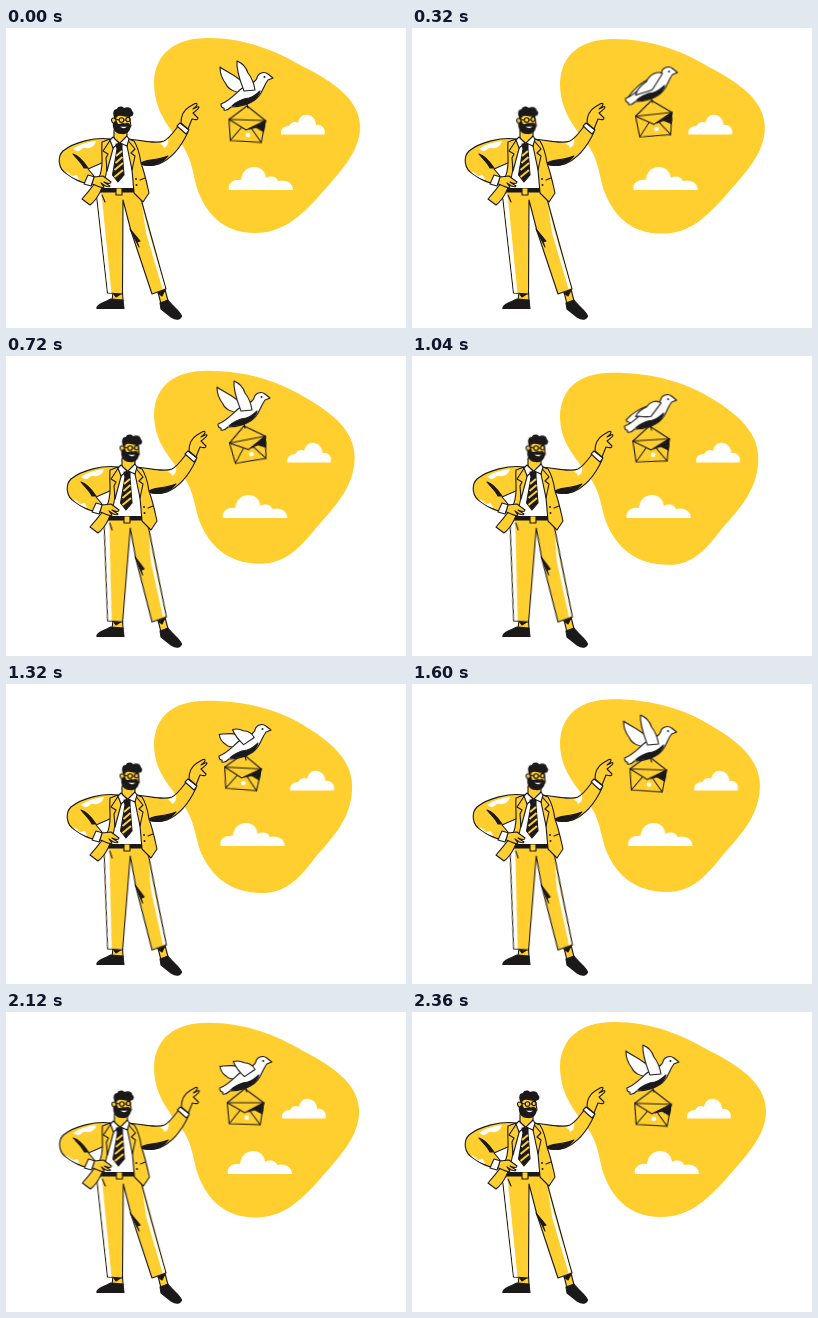
An HTML page without scripts that plays this animation: 400 by 300 pixels, repeating every 2.4 s.

```html
<!DOCTYPE html>
<html lang="en">
<head>
<meta charset="utf-8">
<title>Pigeon post</title>
<style>
  html, body { margin: 0; width: 100%; height: 100%; overflow: hidden; background: #fff; }
  svg { display: block; width: 100%; height: 100%; }
  .y { fill: #ffce2f; }
  .w { fill: #fff; }
  .k { fill: #1b191a; }
  .n { fill: none; }
  .line { stroke: #1b191a; stroke-width: 1.1; stroke-linejoin: round; stroke-linecap: round; }
  .plain { stroke: none; }

  .blob { animation: blob 2.4s ease-in-out infinite; }
  .cloud { animation: drift 2.4s ease-in-out infinite; }
  .high { --dx: 9.5px; }
  .low { --dx: -8.5px; }
  .torso { animation: sway 2.4s ease-in-out infinite; }
  .legs { transform-origin: 0 267px; animation: lean 2.4s ease-in-out infinite; }
  .head { transform-origin: 115px 108px; animation: nod 2.4s ease-in-out infinite; }
  .bird { animation: hover 2.4s linear infinite; }
  .mail { transform-origin: 241px 78px; animation: swing 2.4s linear infinite; }
  .near { animation: near .8s ease-in-out infinite; }
  .far { animation: far .8s ease-in-out infinite; }

  @keyframes blob {
    0%, 100% { d: path("M148 54C149 25 170 10 202 10C240 10 270 23 296 38C328 54 354 72 354 99C354 124 334 144 314 167C293 190 276 205 249 205C216 205 199 184 191 160C186 142 186 130 174 114C160 96 148 80 148 54Z"); }
    50% { d: path("M148 60C149 33 167 17 200 17C242 17 276 27 302 44C328 60 346 78 346 102C346 130 332 148 312 170C295 192 282 209 257 209C222 209 204 190 194 166C188 146 188 136 177 120C162 100 148 86 148 60Z"); }
  }
  @keyframes drift { 50% { transform: translateX(var(--dx)); } }
  @keyframes sway { 0%, 14%, 91%, 100% { transform: none; } 30%, 74% { transform: translateX(8px); } }
  @keyframes lean { 0%, 14%, 91%, 100% { transform: skewX(0deg); } 30%, 74% { transform: skewX(-4.4deg); } }
  @keyframes nod { 0%, 91%, 100% { transform: none; } 14% { transform: rotate(-3deg); } 30%, 74% { transform: rotate(2deg); } }
  @keyframes hover {
    0%, 100% { transform: none; }
    13.3% { transform: translate(-1.5px, -5.5px); }
    30% { transform: translate(-3px, -8px); }
    55% { transform: translate(-2px, -4px); }
    66.7% { transform: translate(-2.5px, -2px); }
    81.7% { transform: translate(-2px, 0); }
  }
  @keyframes swing {
    0%, 100% { transform: rotate(2deg); }
    13.3% { transform: rotate(-6deg); }
    30% { transform: rotate(-11deg); }
    55% { transform: translate(-2px, -4px) rotate(3deg); }
    66.7% { transform: translate(-2.5px, -4.5px) rotate(2deg); }
    81.7% { transform: translate(-1.5px, -2px) rotate(-1deg); }
  }
  @keyframes near {
    0%, 84%, 100% { d: path("M238 63C235 55 230 43 231 33C236 35 240 39 242 45C246 50 248 56 249 62Z"); }
    42% { d: path("M242 67C237 70 231 70 225 73C226 68 230 63 236 59C239 52 247 48 252 51Z"); }
  }
  @keyframes far {
    0%, 84%, 100% { d: path("M238 65C229 65 222 61 220 56C216 51 214 46 214 39C220 44 232 47 241 59Z"); }
    42% { d: path("M240 71C234 72 228 76 224 76C220 77 218 77 217 76C222 68 232 58 244 54Z"); }
  }
</style>
</head>
<body>
<svg viewBox="0 0 400 300" xmlns="http://www.w3.org/2000/svg">
  <path class="blob y" d="M148 54C149 25 170 10 202 10C240 10 270 23 296 38C328 54 354 72 354 99C354 124 334 144 314 167C293 190 276 205 249 205C216 205 199 184 191 160C186 142 186 130 174 114C160 96 148 80 148 54Z"/>
  <path class="cloud high w" d="M275 106.500C274 101 278 98 283 98C285 94 289 93 292 95C293 89 297 86 302 87C307 88 310 92 310 97C316 96 320 101 318.500 106.500Z"/>
  <path class="cloud low w" d="M223 162C221 156 227 151 235 152C236 144 241 139 248 139C255 139 259 143 260 150C265 147 271 149 272 153C280 151 287 155 287 162Z"/>

  <g class="bird">
    <g class="mail line">
      <path class="n" d="M223.500 92L241 78L260 92"/>
      <path class="y" d="M223.500 92H260L256.500 114L225.500 113Z"/>
      <path class="k" d="M260 92L244 101L251 99L258.500 103Z"/>
      <path class="n" d="M223.500 92L241 102L260 92M225.500 113L236 100M256.500 114L246 100"/>
      <circle class="w plain" cx="243" cy="107" r="2.300"/>
    </g>
    <g class="line">
      <path class="far w" d="M238 65C229 65 222 61 220 56C216 51 214 46 214 39C220 44 232 47 241 59Z"/>
      <path class="w" d="M267 50L262 46C258 43 252 45 251 50C249 56 241 56 235 61C228 67 223 73 215 76C215 78 216 80 218 80L218 82C221 83 223 81 225 79C234 79 247 76 253 68C257 63 258 57 262 52Z"/>
      <path class="k" d="M226 78C230 74 235 71 243 70C247 69 251 66 254 63C252 70 245 75 236 77Z"/>
      <path class="near w" d="M238 63C235 55 230 43 231 33C236 35 240 39 242 45C246 50 248 56 249 62Z"/>
      <circle class="k plain" cx="258.500" cy="49" r="1"/>
      <path class="n" d="M241 76L242 80"/>
    </g>
  </g>

  <g class="line">
    <path class="y" d="M107 264H116.500L117 273H106Z"/>
    <path class="y" d="M152 264L159 261L162 273L155 276Z"/>
    <path class="k" d="M107 265H116L110 269Z"/>
    <path class="k" d="M152 265L159 262L156 268Z"/>
    <path class="k" d="M105 271L117 272L118 280.500H91C90 277 97 275 105 271Z"/>
    <path class="k" d="M154 275L162 272C166 278 174 283 175.500 288C174 292 170 292 165 289L155 281Z"/>
  </g>
  <g class="legs line">
    <path class="y" d="M90 163H133C140 190 148 218 160 261L146 266L125 203L117 172L116.500 266L101.500 265C98 235 94 200 90 163Z"/>
    <path class="w plain" d="M91 166L95.500 166L105.500 265L102 264.500Z"/>
    <path class="w plain" d="M136 178L142 201L159 260L156.500 261L140 205Z"/>
    <path class="k" d="M124 201L134 213L131 214L133 219Z"/>
    <path class="n" d="M96 167L99 174"/>
  </g>

  <g class="torso">
    <g class="line">
      <path class="k" d="M91 160.500H128V164H91Z"/>
      <path class="y" d="M110 160H116V167H110Z"/>
      <path class="w plain" d="M103 112L123 111L128 160L93 160Z"/>
      <!-- raised arm -->
      <path class="y" d="M123 111C137 113 151 116 158 113C165 109 169 102 173 97L182 104C176 117 167 130 153 136C146 138 138 137 132 135Z"/>
      <path class="k" d="M134 136C138 131 151 133 162 128C154 138 143 139 134 136Z"/>
      <path class="w plain" d="M153 115.500C157 115 160 113 162 111C163 115 161 119 158 120C157 117 155 116 153 115.500Z"/>
      <path class="w" d="M174 95L183 102L180 106L171 98Z"/>
      <path class="y" d="M175 95C175 87 178 82 183 79L189 75.500C192 75 192 77 187 81L191 79C194 78 194 80 187 85L192 90C192 92 190 92 186 91L182 101Z"/>
      <!-- arm on the hip -->
      <path class="y" d="M104 111C89 109 68 114 57 123C51 129 52 141 61 146C68 151 74 154 79 155L88 148L82 141L98 134Z"/>
      <path class="w plain" d="M67 121C74 116 82 114 90 113C89 118 84 121 80 120C76 119 74 124 71 123Z"/>
      <path class="w plain" d="M58 143L63 145L66 148L71 147L73 152C67 150 62 147 58 143Z"/>
      <path class="k" d="M67 126C73 128 78 134 82 140L78 140C75 134 71 131 67 126Z"/>
      <!-- jacket -->
      <path class="y" d="M104 111L96 114C95 126 98 136 94 147C90 155 83 163 76 171L84 177C92 171 98 158 101 141Z"/>
      <path class="y" d="M120 110L128 113C133 121 134 128 135 135C139 146 141 156 143 165L137 174L128 165C127 152 126 142 125 131Z"/>
      <path class="y" d="M105 111L97 123L102 126L100 130L101 143L108 117Z"/>
      <path class="y" d="M120 110L129 121L125 125L129 128L126 142L121 118Z"/>
      <path class="n" d="M134 152L139 150"/>
      <circle class="k plain" cx="130" cy="151" r="1"/>
      <circle class="k plain" cx="130.500" cy="157" r="1"/>
      <path class="w" d="M82 147L89 149L85 158L78 156Z"/>
      <path class="y" d="M88 149L97 148L105 154C105 156 102 156 98 154L104 158C102 160 97 157 95 155L98 159C95 161 91 157 86 156Z"/>
      <!-- collar and tie -->
      <path class="y" d="M108 102H121V109L115 116L108 111Z"/>
      <path class="w" d="M107 109L113 115L107 120L104 112Z"/>
      <path class="w" d="M121 108L114 115L121 118L123 111Z"/>
      <path class="k" d="M110 116H116L116 121L118 147L112 154L106.500 147L111 121Z"/>
    </g>
    <path class="n" stroke="#ffce2f" stroke-width="2" d="M110 128L116 123M109.500 135L116.500 129M108.500 142L117 135M108.500 149L117 142"/>

    <g class="head">
      <path class="y line" d="M109 87L123 86L125 98L121 103H110Z"/>
      <path class="y line" d="M110 91C106 88 104 92 107 95L110 96Z"/>
      <path class="k" d="M109 91C106 86 107 81 111 81C112 78 116 78 118 80C122 78 126 80 126 83C129 85 127 89 123 89C119 89 116 87 112 88Z"/>
      <path class="k" d="M107 95L110 92L112 96C115 96 117 94 119 95.500C121 94 123 95 124.500 97C125 103 121 107 115 106C109 106 106 100 107 95Z"/>
      <path class="w" d="M114 98.500Q118 99 121 98.500Q118 102 114 98.500Z"/>
      <g class="n line" stroke-width=".8">
        <circle cx="115.500" cy="92" r="2.300"/>
        <circle cx="122" cy="91.500" r="2.100"/>
        <path d="M109 91L113 92M118 92H120"/>
      </g>
    </g>
  </g>
</svg>
</body>
</html>
```
